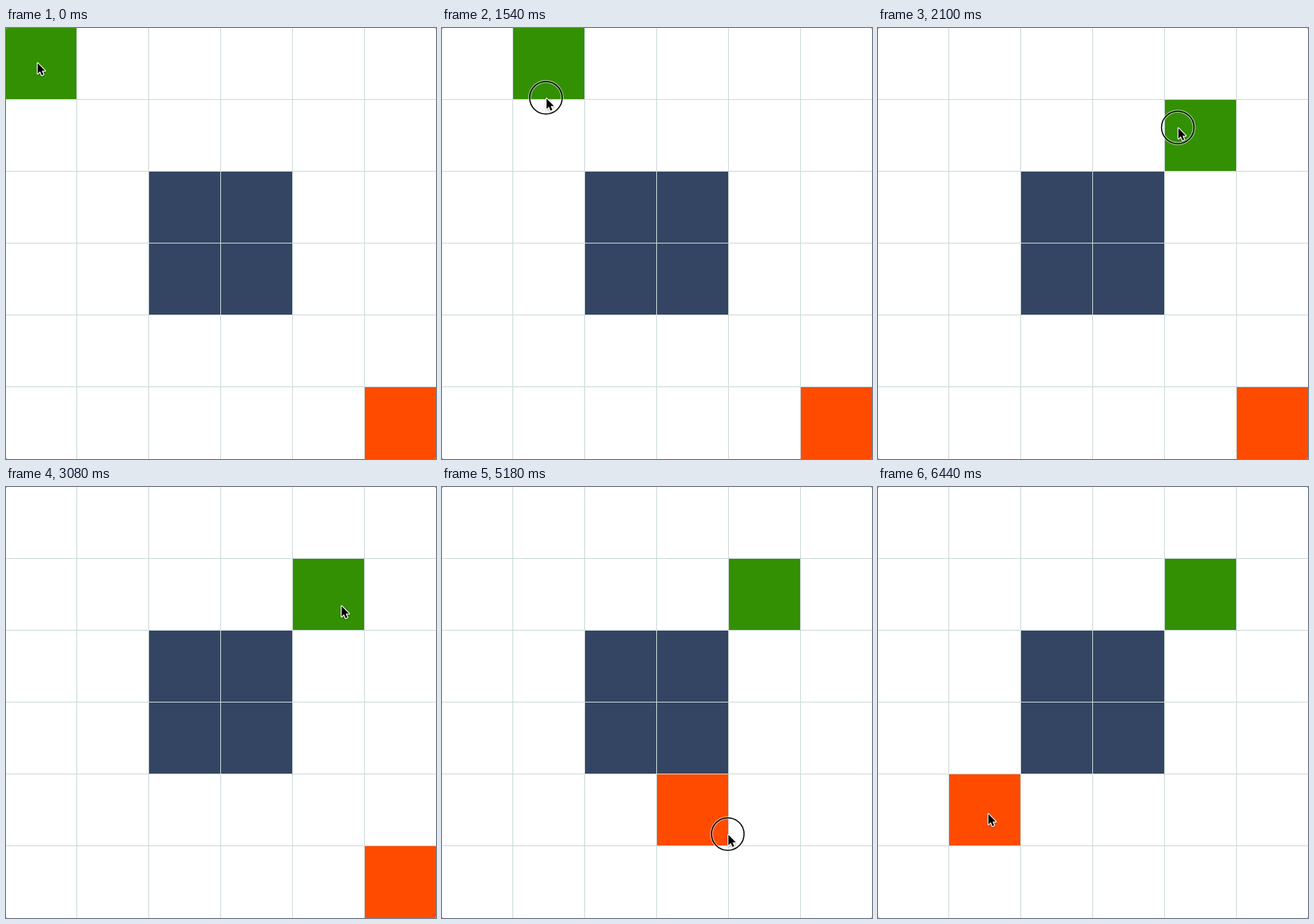
An HTML page that plays this animation: 568x570 px, repeating every 6510 ms.

```html
<!DOCTYPE html>
<html lang="en">
<head>
<meta charset="utf-8">
<title>Dragging on a grid</title>
<style>
  html, body { margin: 0; width: 100%; height: 100%; overflow: hidden; background: #777; }
  svg { display: block; width: 568px; height: 570px; border-radius: 2px; background: #fff; }
  .lines { stroke: #cbd9d9; stroke-width: 1; }
  .wall { fill: #344563; }
  #green { fill: #339003; }
  #orange { fill: #ff4b00; }
  #ring circle { fill: none; }
  .halo { stroke: #fff; stroke-width: 4; opacity: .5; }
  .edge { stroke: #000; stroke-width: 1.5; }
  #arrow {
    fill: #000; stroke: #fff; stroke-width: 2.4; stroke-linejoin: round; paint-order: stroke;
    filter: drop-shadow(0 1px 1px rgba(0, 0, 0, .3));
  }
</style>
</head>
<body>
<svg viewBox="0 0 568 570">
  <rect class="wall" x="189" y="190" width="190" height="190"/>
  <rect id="green" width="95" height="95"/>
  <rect id="orange" width="95" height="95"/>
  <path class="lines" d="M93.5 0V570M188.5 0V570M283.5 0V570M378.5 0V570M473.5 0V570
    M0 94.5H568M0 189.5H568M0 284.5H568M0 379.5H568M0 474.5H568"/>
  <g id="pointer">
    <g id="ring">
      <circle class="halo" r="21.5"/>
      <circle class="edge" r="21.5"/>
    </g>
    <path id="arrow" d="M.8 1V14.8L4 11.8L6.2 17L8.4 16L6.3 11H10.6Z"/>
  </g>
</svg>
<script>
const LOOP = 6510, STEP = 70, CELL = 95;
const $ = id => document.getElementById(id);

// Pointer path: time, x, y
const path = [
  [0, 41, 45.5], [140, 36.7, 45.5], [1050, 36.7, 45.5], [1330, 69, 63],
  [1540, 137.3, 92.3], [1750, 212, 112], [1890, 288, 121], [2100, 396, 131.5],
  [2275, 426, 136], [2450, 435, 139], [3010, 435, 139], [3080, 442.5, 156.5],
  [3360, 486, 320], [3710, 531, 477], [3850, 530.5, 507], [4200, 528.4, 524.4],
  [4690, 528.4, 524.4], [4900, 481, 503], [5180, 377.5, 459], [5390, 315, 430],
  [5600, 240, 400], [5810, 182, 376], [5950, 146, 362], [6090, 150, 405],
  [6160, 157, 436], [6230, 160, 449], [6370, 145, 431.5], [LOOP, 145, 431.5]
];

const rate = (i, k) => (path[i + 1][k] - path[i][k]) / (path[i + 1][0] - path[i][0]);

// Monotone tangent: zero at rests and turning points
function slope(i, k) {
  if (i === 0 || i === path.length - 1) return 0;
  const a = rate(i - 1, k), b = rate(i, k);
  return a * b > 0 ? 2 * a * b / (a + b) : 0;
}

function along(t, k) {
  let i = 0;
  while (i < path.length - 2 && t >= path[i + 1][0]) i++;
  const p = path[i], q = path[i + 1], h = q[0] - p[0], u = (t - p[0]) / h, v = 1 - u;
  return v * v * (1 + 2 * u) * p[k] + u * u * (3 - 2 * u) * q[k]
    + h * u * v * (v * slope(i, k) - u * slope(i + 1, k));
}

const isWall = (c, r) => (c === 2 || c === 3) && (r === 2 || r === 3);

// Cell of a block dragged between two times; walls leave it where it was
function cellAt(t, from, to, home) {
  let cell = home;
  for (let s = from; s <= Math.min(t, to); s += STEP) {
    const c = Math.floor((along(s, 1) + 1) / CELL), r = Math.floor(along(s, 2) / CELL);
    if (!isWall(c, r)) cell = [c, r];
  }
  return cell;
}

function place(id, [c, r]) {
  $(id).setAttribute("x", c * CELL - 1);
  $(id).setAttribute("y", r * CELL);
}

function ringAlpha(t) {
  if (t === 560 || t === 2590 || t === 6370) return .5;
  return (t > 560 && t < 2590) || (t >= 4340 && t < 6370) ? 1 : 0;
}

function draw(now) {
  const t = Math.floor(now % LOOP / STEP) * STEP;
  place("green", cellAt(t, 560, 2590, [0, 0]));
  place("orange", cellAt(t, 4340, 6370, [5, 5]));
  $("pointer").setAttribute("transform", `translate(${along(t, 1)} ${along(t, 2)})`);
  $("ring").setAttribute("opacity", ringAlpha(t));
}

const start = performance.now();
function tick() {
  draw(performance.now() - start);
  requestAnimationFrame(tick);
}
tick();
</script>
</body>
</html>
```
